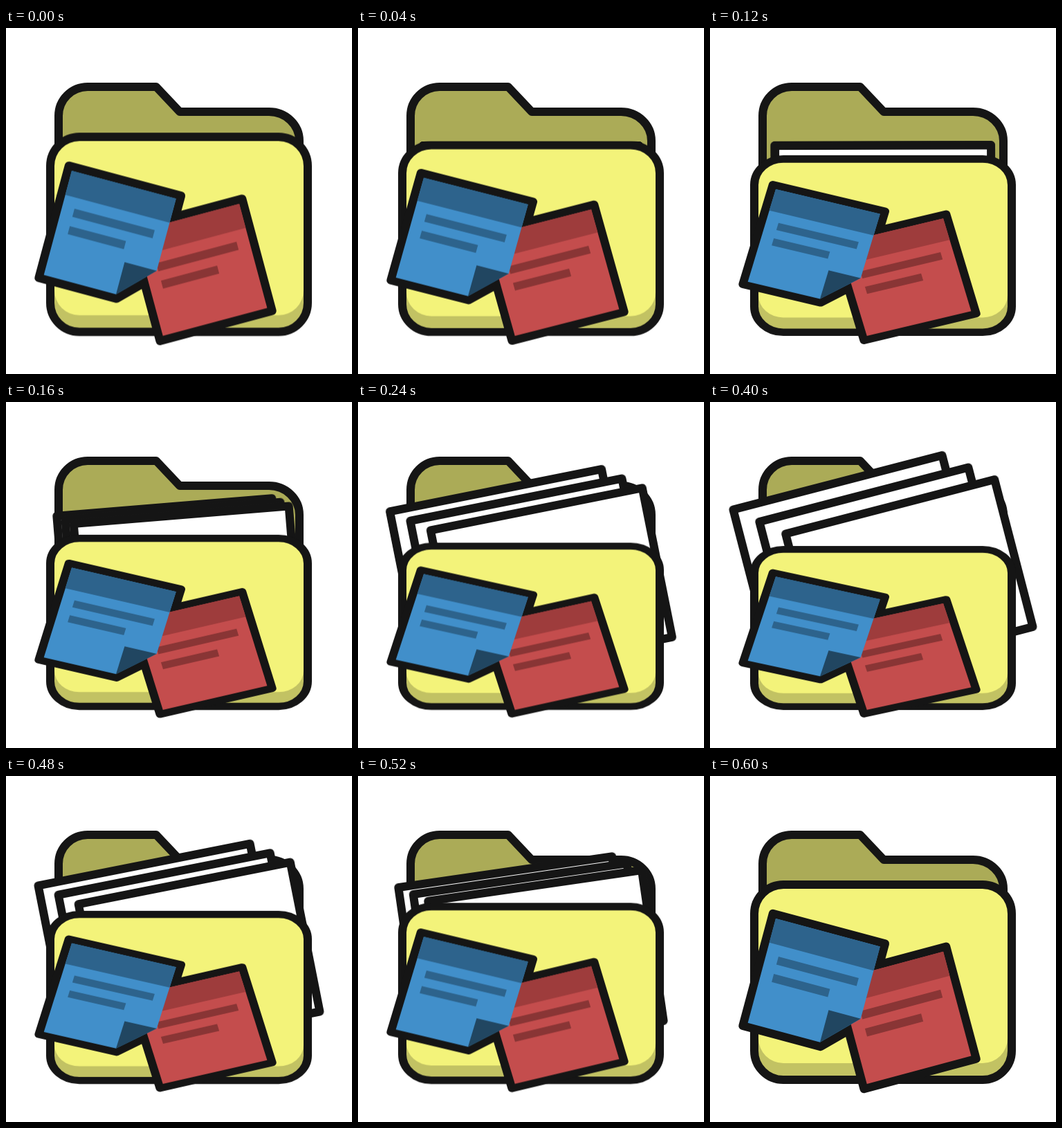
These frames come from a looping animation (500x500 px, 0.8 s). An HTML page:

```html
<!DOCTYPE html>
<html lang="en">
<head>
<meta charset="utf-8">
<title>Folder</title>
<style>
  html, body { margin: 0; width: 100%; height: 100%; overflow: hidden; background: #fff; }
  svg { display: block; width: 100%; height: 100%; }

  .ink { stroke: #151515; stroke-width: 12; stroke-linejoin: round; }

  /* Quadratic ease out on the way open, quadratic ease in on the way shut */
  .front, .sheet { animation: 800ms infinite; }
  .front { transform-origin: 250px 445px; animation-name: squash; }
  .sheet { transform-origin: 250px 280px; animation-name: fan; fill: #fff; }

  @keyframes squash {
    0% { transform: scaleY(1); animation-timing-function: cubic-bezier(.3333, .6667, .6667, 1); }
    45% { transform: scaleY(.8); animation-timing-function: cubic-bezier(.3333, 0, .6667, .3333); }
    75%, 100% { transform: scaleY(1); }
  }
  @keyframes fan {
    0% { transform: translate(0, 0) rotate(0deg); }
    15% { transform: translate(0, 0) rotate(0deg); animation-timing-function: cubic-bezier(.3333, .6667, .6667, 1); }
    45% { transform: translate(var(--x), var(--y)) rotate(-15deg); animation-timing-function: cubic-bezier(.3333, 0, .6667, .3333); }
    75%, 100% { transform: translate(0, 0) rotate(0deg); }
  }

  .back-sheet { --x: -39px; --y: -59px; }
  .mid-sheet { --x: 0px; --y: -41px; }
  .top-sheet { --x: 39px; --y: -23px; }
</style>
</head>
<body>
<svg viewBox="0 0 500 500">
  <defs>
    <rect id="sheet" class="ink" x="94" y="170" width="312" height="220"/>
    <path id="bars" d="M24 58h120v12H24zM24 84h84v12H24z"/>
  </defs>

  <path class="ink" fill="#abab57" d="M76 400V127A42 42 0 0 1 118 85H217L251 121H380A44 42 0 0 1 424 163V400Z"/>

  <g class="sheet back-sheet"><use href="#sheet"/></g>
  <g class="sheet mid-sheet"><use href="#sheet"/></g>
  <g class="sheet top-sheet"><use href="#sheet"/></g>

  <g class="front">
    <rect x="64" y="157" width="372" height="282" rx="42" fill="#c2c263"/>
    <rect x="70" y="163" width="360" height="252" rx="36" fill="#f3f37a"/>
    <rect class="ink" x="64" y="157" width="372" height="282" rx="42" fill="none"/>

    <!-- Both outlines lie under both note faces -->
    <path class="ink" fill="#151515" transform="translate(90.8 198.7) rotate(15)" d="M0 0H168V116.5L116.5 168H0Z"/>
    <g transform="translate(179 290) rotate(-15)">
      <path class="ink" fill="#151515" d="M0 0H168V168H0Z"/>
      <path fill="#c44d4d" d="M6 6H162V162H6Z"/>
      <path fill="#9e3c3c" d="M6 6H162V42H6Z"/>
      <use href="#bars" fill="#893535"/>
    </g>
    <g transform="translate(90.8 198.7) rotate(15)">
      <path fill="#418fca" d="M6 6H162V114L114 162H6Z"/>
      <path fill="#2d638c" d="M6 6H162V42H6Z"/>
      <use href="#bars" fill="#2d638c"/>
      <path fill="#214661" d="M114 114H162L114 162Z"/>
    </g>
  </g>
</svg>
</body>
</html>
```
